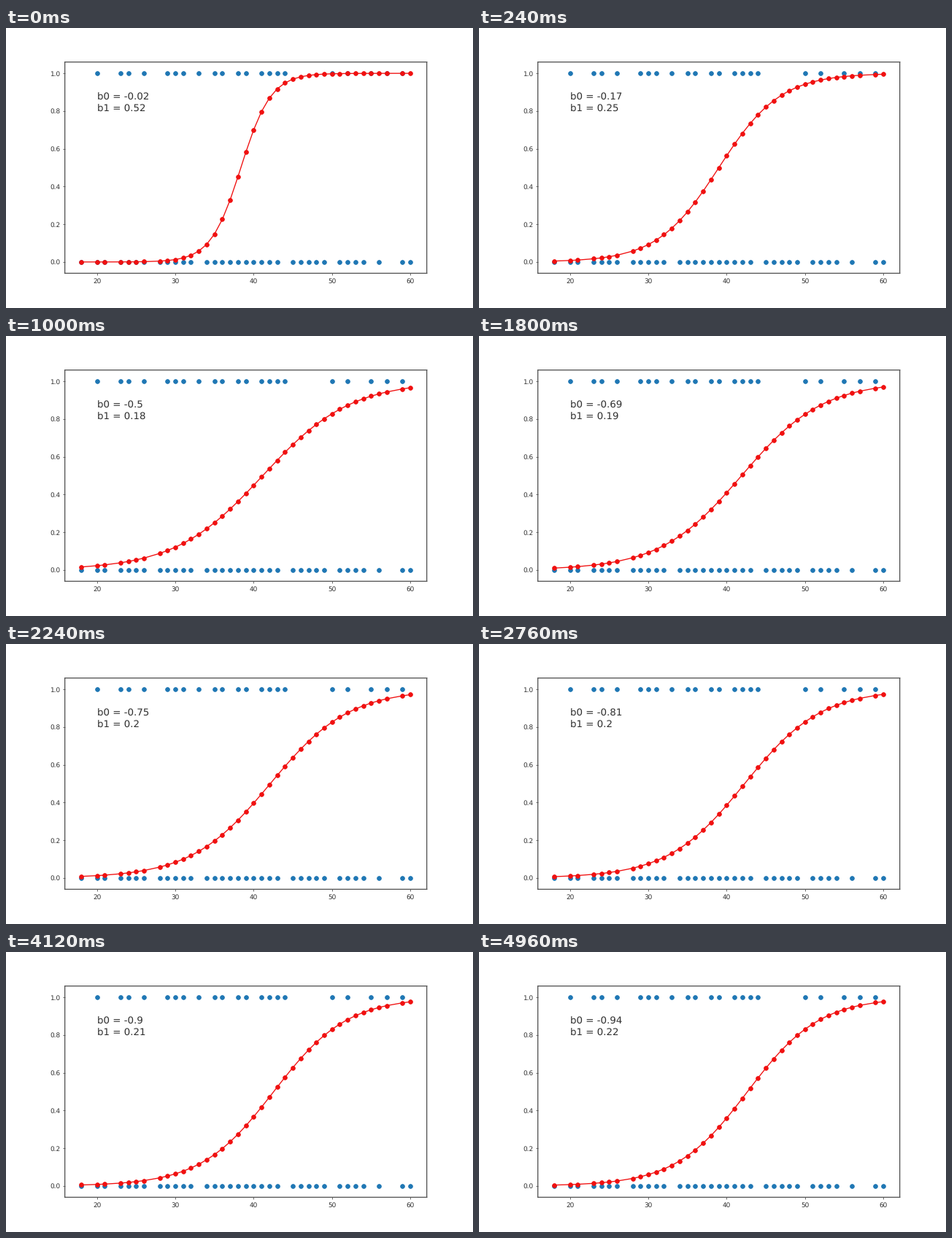
These frames come from a looping animation (640 by 384 pixels, 5000 ms). A matplotlib script:

```python
import matplotlib.pyplot as plt
import numpy as np
from matplotlib.animation import FuncAnimation

FRAMES, STEP_MS = 125, 40
INK = "#303030"
BLUE = "#1f77b4"
RED = "#f01010"
MEAN_AGE = 38.33

plt.rcParams.update({
    "font.family": "DejaVu Sans",
    "text.hinting": "no_hinting",
    "text.color": INK,
    "xtick.color": INK,
    "ytick.color": INK,
    "axes.edgecolor": "#555555",
    "axes.linewidth": 1.5,
    "lines.markersize": 6.4,
})

# Observed ages for each class: ranges with gaps
yes = set(range(20, 45)) - {21, 22, 25, 27, 28, 32, 34, 37, 40}
yes |= {50, 52, 55, 57, 59}
no = set(range(18, 61)) - {19, 22, 27, 33, 44, 50, 55, 57, 58}
ages = np.array(sorted(yes | no))


def intercept(n):
    """Drifts down quickly at first, then levels off."""
    return -0.02 - n / (28 + 0.862 * n + 9.45 * np.exp(-n / 17))


def slope(n):
    """Steep start that decays fast onto a slowly rising curve."""
    settled = 0.225 - 0.0735 * np.exp(-n / 56)
    return settled + 0.3685 * np.exp(-(n / 4.9) ** 1.5)


fig = plt.figure(figsize=(10, 6), dpi=64, facecolor="white")
ax = fig.add_axes([0.126, 0.124, 0.775, 0.7545])
ax.set_xlim(15.9, 62.1)
ax.set_ylim(-0.06, 1.06)
ax.set_xticks(range(20, 61, 10))
ax.set_yticks(np.linspace(0, 1, 6))
for spine in ax.spines.values():
    spine.set_snap(False)

for level, group in enumerate((no, yes)):
    ax.plot(sorted(group), [level] * len(group), "o", color=BLUE)
curve, = ax.plot([], [], "o-", color=RED)
label = ax.text(20, 0.798, "", fontsize=15, linespacing=1.28)


def update(n):
    b0, b1 = intercept(n), slope(n)
    curve.set_data(ages, 1 / (1 + np.exp(-b0 - b1 * (ages - MEAN_AGE))))
    label.set_text(f"b0 = {round(float(b0), 2)}\nb1 = {round(float(b1), 2)}")
    return curve, label


anim = FuncAnimation(fig, update, frames=FRAMES, interval=STEP_MS,
                     repeat=True, repeat_delay=0)
plt.show()
```
